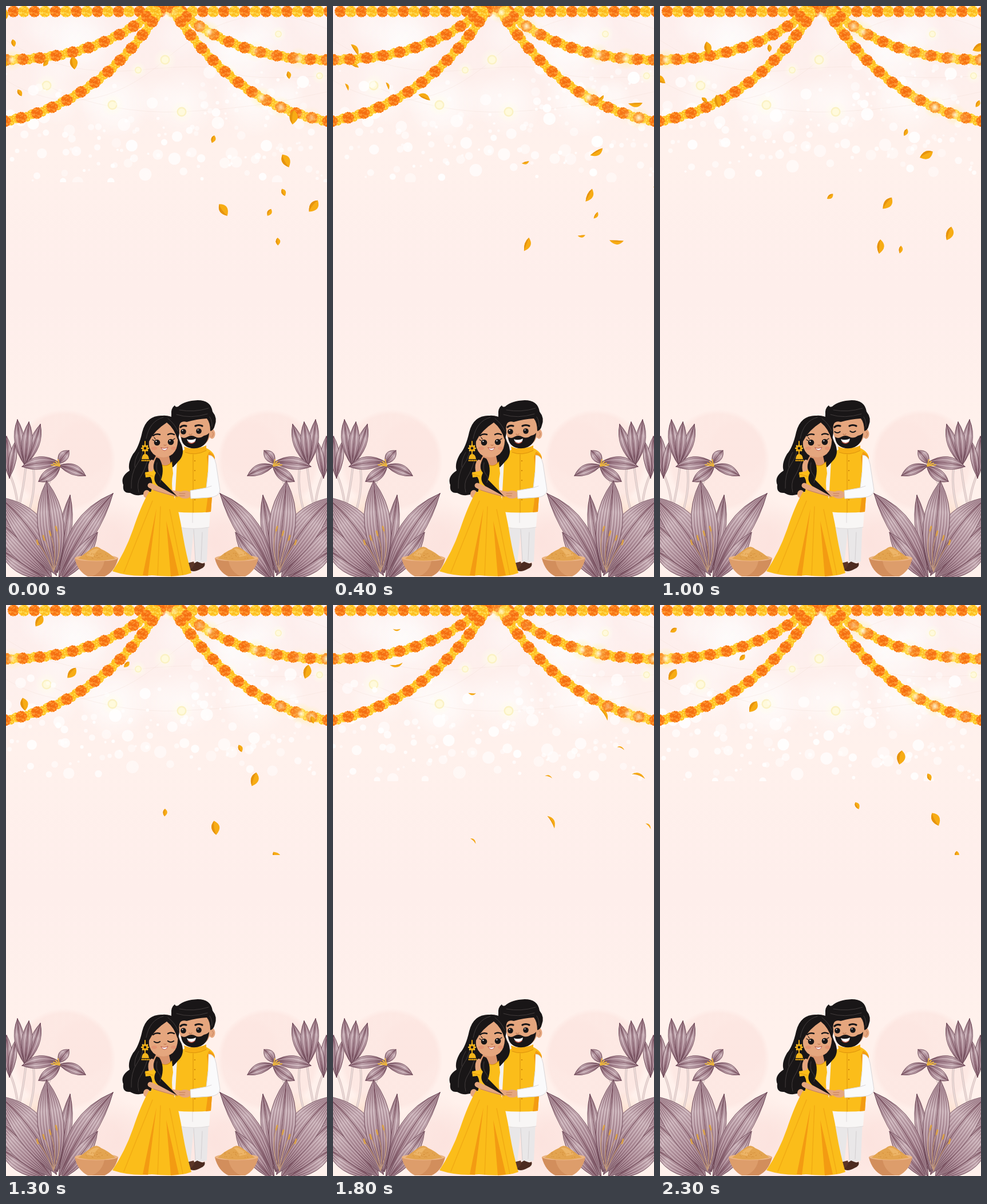
Recreate the animation shown at these times as an HTML page with a canvas. Size 561 by 998 pixels, loop 2400 ms.

```html
<!DOCTYPE html>
<html lang="en">
<head>
<meta charset="utf-8">
<title>Marigold celebration</title>
<style>
html, body { margin: 0; width: 100%; height: 100%; overflow: hidden; background: #fff1ec; }
canvas { display: block; }
</style>
</head>
<body>
<canvas id="stage" width="561" height="998"></canvas>
<script>
const W = 561, H = 998, LOOP = 2400, STEP = 100, TAU = Math.PI * 2;
const stage = document.getElementById('stage').getContext('2d');
let c = stage;

let seed = 11;
const rnd = (min = 0, max = 1) => min + (max - min) * (seed = seed * 16807 % 2147483647) / 2147483647;
const times = (n, make) => Array.from({ length: n }, (_, i) => make(i));

function layer(w, h, draw) {
  const canvas = document.createElement('canvas');
  canvas.width = w;
  canvas.height = h;
  c = canvas.getContext('2d');
  draw();
  c = stage;
  return canvas;
}

function fill(d, color) {
  c.fillStyle = color;
  c.fill(new Path2D(d));
}

function line(d, color, width = 1) {
  c.strokeStyle = color;
  c.lineWidth = width;
  c.lineCap = c.lineJoin = 'round';
  c.stroke(new Path2D(d));
}

function oval(x, y, rx, ry, color) {
  c.fillStyle = color;
  c.beginPath();
  c.ellipse(x, y, rx, ry, 0, 0, TAU);
  c.fill();
}

const dot = (x, y, r, color) => oval(x, y, r, r, color);

function glow(x, y, r, rgb, alpha, hold = 0) {
  const g = c.createRadialGradient(x, y, 0, x, y, r);
  g.addColorStop(0, `rgba(${rgb},${alpha})`);
  g.addColorStop(hold, `rgba(${rgb},${alpha})`);
  g.addColorStop(1, `rgba(${rgb},0)`);
  dot(x, y, r, g);
}

function mirrored(draw) {
  draw();
  c.save();
  c.translate(W, 0);
  c.scale(-1, 1);
  draw();
  c.restore();
}

function below(limit, draw) {
  c.save();
  c.beginPath();
  c.rect(0, 0, W, limit);
  c.clip();
  draw();
  c.restore();
}

// Backdrop

function washes() {
  const peach = '251,222,217';
  glow(102, 795, 90, peach, .45, .9);
  glow(135, 775, 54, peach, .15, .8);
  glow(175, 930, 75, '249,214,210', .4, .3);
  glow(60, 895, 45, '250,214,190', .6, .3);
  glow(230, 960, 90, peach, .4, .4);
}

function backdrop() {
  const g = c.createLinearGradient(0, 0, 0, H);
  ['#fdeeed', '#fff1ec', '#feeeeb', '#fff1ec', '#fff1ec'].forEach((color, i) => g.addColorStop(i / 4, color));
  c.fillStyle = g;
  c.fillRect(0, 0, W, H);
  for (let i = 0; i < 26; i++) {
    glow(rnd(0, W), rnd(0, 185), rnd(25, 70), '255,255,255', .3, .3);
  }
  for (const x of [190, 310, 435]) glow(x, 170, 60, '255,255,255', .65);
  line('M0 60Q100 125 231 112T391 115T561 122M0 130Q140 215 278 94T561 40M70 139Q180 190 307 185T561 150',
    'rgba(240,216,208,.4)', .8);
  [[278, 94], [186, 173], [307, 185], [71, 139], [231, 112], [476, 49], [391, 115], [548, 122]]
    .forEach(([x, y], i) => {
      const r = i < 4 ? 8.5 : 6;
      glow(x, y, r * 2.4, '255,253,235', .9);
      dot(x, y, r, '#fbf2c4');
      dot(x, y, r * .72, '#fffadc');
    });
  mirrored(washes);
}

// Floating lights, denser towards the top right

const lights = times(190, () => ({
  x: rnd(0, W), y: rnd(115, 310), r: 2 + 9 * rnd() ** 2, a: rnd(.45, .95), p: rnd(0, .8)
})).filter(({ x, y }) => y > 205 || x > 340 || rnd() < .25);

function drawLights(t) {
  const w = t / LOOP * TAU;
  for (const { x, y, r, a, p } of lights) {
    dot(x + 16 * (Math.sin(w + p) - Math.sin(p)), y - 8 * (1 - Math.cos(w + p)), r,
      `rgba(255,255,255,${a * (.85 + .15 * Math.cos(w + p * 8))})`);
  }
}

// Marigold garlands

function marigold(dark, mid, light) {
  return layer(48, 48, () => {
    c.translate(24, 24);
    for (let ring = 18; ring > 2; ring -= 4.5) {
      const n = Math.round(ring * .7) + 2;
      dot(0, 0, ring + 2, dark);
      for (let i = 0; i < n; i++) {
        const a = i / n * TAU + ring;
        const x = Math.cos(a) * ring, y = Math.sin(a) * ring;
        dot(x, y, 3 + ring / 9, i % 3 ? mid : light);
        dot(x * .86, y * .86, 1.4, dark);
      }
    }
  });
}

const orange = marigold('#e5500a', '#f97714', '#ff9a33');
const yellow = marigold('#f5a10e', '#ffc122', '#ffdd55');

function bloom(img, x, y, r) {
  c.drawImage(img, x - r, y - r, r * 2, r * 2);
}

// Evenly spaced points on a quadratic curve
function beadsOn(x0, y0, cx, cy, x1, y1, gap = 9.4) {
  const mix = (a, b, d, u) => (1 - u) ** 2 * a + 2 * u * (1 - u) * b + u * u * d;
  const beads = [[x0, y0]];
  for (let u = 0; u <= 1; u += .002) {
    const x = mix(x0, cx, x1, u), y = mix(y0, cy, y1, u);
    const [px, py] = beads[beads.length - 1];
    if (Math.hypot(x - px, y - py) >= gap) beads.push([x, y]);
  }
  return beads;
}

const strands = [beadsOn(268, 0, 165, 97, -12, 94), beadsOn(272, 3, 161, 178, -12, 203)];

function garlands() {
  for (let i = 0; i < 31; i++) bloom(i % 2 ? yellow : orange, 13 + i * 18.4, 9.5, 10.8);
  mirrored(() => {
    for (const beads of strands) {
      beads.forEach(([x, y], i) => i % 3 && bloom(yellow, x, y + (i % 3 - 1.5) * 2, 9));
      beads.forEach(([x, y], i) => i % 3 || bloom(orange, x, y, 10.8));
    }
    bloom(yellow, 262, 10, 10);
  });
  glow(281, 18, 9, '255,250,240', .8, .3);
}

const glints = strands.flat().filter(() => rnd() < .22).map(([x, y]) => [rnd() < .6 ? W - x : x, y]);

function drawGlints(t) {
  glints.forEach(([x, y], i) => {
    const a = .5 + .4 * Math.sin(t / LOOP * TAU * (1 + i % 2) + i * 1.7);
    glow(x, y, 20, '255,240,130', a * .55);
    glow(x, y, 7, '255,255,235', a);
  });
}

// Falling petals: starting points, then one constant drift per size and side

const petals = [];
function shower(side, size, starts) {
  for (const [x, y] of starts) petals.push({ x, y, side, size, angle: rnd(-.7, .7) });
}

shower(-1, 12, [[489, 271], [380, 357], [537, 350], [502, 195], [570, 110], [610, 248], [723, 30], [662, -78]]);
shower(-1, 6.5, [[362, 233], [485, 326], [460, 361], [475, 412], [494, 121], [620, 71], [668, 207]]);
shower(1, 11, [[118, 100], [-4, 17], [-22, -76], [-79, -167], [-105, -21], [-220, -223]]);
shower(1, 6.5, [[13, 65], [24, 152], [69, 100], [-2, 102], [126, -26], [-6, -138], [-126, -186]]);

function drawPetal({ x, y, side, size, angle }, s) {
  const big = size > 8;
  const fallen = y + (big ? 150 : 100) * s;
  if (side > 0 && fallen > 185) return;
  const open = .15 + .85 * Math.abs(Math.cos(s * Math.PI / 1.2 + angle * .3));
  const bend = 9 * (1 - open), half = 13 * open;
  c.save();
  c.translate(x + side * (big ? 105 : 65) * s, fallen);
  c.rotate(angle - side * Math.sin(s * 2.6) * 1.1);
  c.scale(size / 12, size / 12);
  fill(`M0-13Q${bend + half + 3}-2 0 12Q${bend - half}-2 0-13Z`, '#f7ac14');
  fill(`M0-13Q${bend - half * .3}-2 0 12Q${bend - half}-2 0-13Z`, '#e6930e');
  c.restore();
}

// Lilies and bowls

function leaf(x0, y0, x1, y1, width, bend = 0) {
  const dx = x1 - x0, dy = y1 - y0, len = Math.hypot(dx, dy);
  const curve = k => {
    const off = bend + k * width;
    return `${x0 + dx * .55 - dy / len * off} ${y0 + dy * .55 + dx / len * off}`;
  };
  const g = c.createLinearGradient(x0, y0, x1, y1);
  ['#6a4251', '#a98793', '#c9b0b7', '#8c6573'].forEach((color, i) => g.addColorStop(i / 3, color));
  const outline = `M${x0} ${y0}Q${curve(-1)} ${x1} ${y1}Q${curve(1)} ${x0} ${y0}Z`;
  fill(outline, g);
  const count = Math.max(2, Math.round(width / 5));
  for (let i = -count + 1; i < count; i++) {
    line(`M${x0} ${y0}Q${curve(i / count)} ${x1} ${y1}`,
      i % 2 ? 'rgba(98,58,76,.4)' : 'rgba(236,222,226,.55)', .9);
  }
  line(`M${x0} ${y0}Q${curve(0)} ${x1} ${y1}`, '#79505f', 1.3);
  line(outline, 'rgba(95,58,74,.75)', 1);
}

function lilies() {
  const stems = 'M35 798Q32 850 5 945M8 822Q20 850 22 890M90 808Q65 845 52 900M46 795Q55 840 38 890';
  line(stems, '#d9c3c2', 4);
  line(stems, '#f1e3df', 1.5);
  leaf(6, 825, 1, 752, 16);
  leaf(6, 825, 17, 760, 13);
  for (const lean of [-1, 1, 0]) leaf(33, 803, 40 + lean * 20, 727 + lean * 4, 18, lean * 4);
  leaf(92, 800, 110, 777, 17, -3);
  leaf(92, 803, 139, 821, 18, -5);
  leaf(94, 798, 28, 805, 22, 6);
  leaf(95, 804, 57, 831, 20, -3);
  for (let i = 0; i < 4; i++) line(`M94 804L${79 + i * 4} ${802 - i * 3}`, '#e9b23e', 2);

  leaf(90, 990, 112, 855, 22, 3);
  leaf(70, 1002, -12, 948, 34);
  leaf(80, 1000, -20, 895, 54, 10);
  leaf(88, 995, -12, 858, 54, 20);
  leaf(88, 990, 71, 830, 46, -2);
  leaf(92, 1000, 187, 852, 40, -15);
  leaf(95, 1004, 160, 920, 26, 4);
  for (let i = 0; i < 4; i++) {
    const x = 55 + i * 11, y = 938 - i * 8;
    line(`M83 988Q${x + 12} 950 ${x} ${y}`, '#c49a7a', 1.4);
    line(`M${x - 1} ${y - 4}l2 7`, '#d9a048', 3);
  }
}

function bowl() {
  fill('M120 965Q125 988 143 997L172 997Q190 989 196 965Z', '#dd9d6b');
  fill('M160 970L196 965Q190 989 172 997L150 997Q168 990 172 970Z', '#d28e5c');
  oval(158, 965, 38, 5.5, '#ecb584');
  fill('M126 966Q140 955 150 948Q158 942 166 949Q180 955 191 966Q158 973 126 966Z', '#e3a450');
  fill('M140 960Q153 945 163 949Q155 955 153 963Z', '#edb568');
  for (let i = 0; i < 30; i++) dot(rnd(138, 180), rnd(956, 966), .6, '#cf8835');
}

// Couple

const SKIN = '#e5a67e', FOLD = '#c27e58', INK = '#191617', SHEEN = '#423c3c', GOLD = '#fbbd1a', SHADE = '#f39b12';

function eye(x, y, r, closed) {
  if (closed) return line(`M${x - r} ${y}Q${x} ${y + 4} ${x + r} ${y}`, INK, 1.8);
  dot(x, y, r, INK);
  dot(x - r * .3, y - r * .4, r * .2, '#fff');
}

function man(closed) {
  fill('M302 900L354 900L351 971L331 974L328 918L322 976L303 972Z', '#e9e7e8');
  line('M328 915L331 970M343 920L341 968', '#d3cfd1');
  fill('M321 986Q322 977 334 971Q344 976 347 973Q350 980 340 984Q328 991 321 986Z', '#4c2b20');
  fill('M312 975L328 971Q332 978 322 985Z', '#5c3526');
  fill('M297 870L358 870L355 911Q328 916 301 911Z', '#f8f6f5');
  line('M326 886V903M355 911Q328 916 301 911', '#dedada');
  fill('M302 785Q287 798 284 835L302 845Z', '#f4f2f2');
  fill('M299 795Q299 780 315 774L346 771Q364 778 365 790L358 884Q328 887 294 884Z', GOLD);
  fill('M355 779Q365 785 365 790L358 884L349 885Q358 830 351 788Z', SHADE);
  fill('M311 770Q330 778 350 768L350 777Q330 787 313 780Z', '#f8b015');
  line('M313 780Q330 787 350 777M327 784V885', '#dc930c');
  for (let y = 795; y < 880; y += 17) dot(330, y, 1.1, '#c97e08');

  oval(360, 748, 5.5, 8.5, SKIN);
  line('M360 744Q365 747 360 753', FOLD);
  fill('M302 728Q300 771 331 772Q360 768 358 735L354 714Q325 705 302 728Z', SKIN);
  fill('M306 753Q311 757 317 753Q324 749 331 753Q338 757 346 751Q352 750 355 746Q354 764 340 771Q330 775 320 772Q307 768 306 753Z', INK);
  fill('M316 757Q324 760 332 756Q331 764 324 764Q318 763 316 757Z', '#fff');
  line('M318 762Q324 767 330 762', '#b4493c', 1.3);
  fill('M296 735Q287 729 289 714Q288 703 295 698Q296 702 301 700Q312 690 335 689Q358 689 361 709Q370 720 365 733Q363 742 357 743Q357 728 351 721Q333 722 316 727Q305 724 303 733L300 752Q297 743 296 735Z', INK);
  line('M298 714Q322 722 352 713M303 706Q328 711 354 703M356 718Q361 726 360 735', SHEEN, 1);
  line('M305 736Q309 732 315 734M331 734Q337 731 343 734', INK, 3.2);
  line('M320 748Q322 751 325 748', FOLD, 1.4);
  eye(310, 744, 4.8, closed);
  eye(337, 743, 4.8, closed);
}

function woman(closed) {
  fill('M272 716Q245 716 238 745Q232 772 222 783Q212 800 216 812Q199 823 205 837Q203 852 217 851Q230 859 245 852L264 845Q274 805 292 806L301 796Q313 785 307 767Q300 755 299 738Q293 716 272 716Z', INK);
  line('M241 765Q240 785 229 801T219 843M247 795Q242 812 235 823T232 850M232 780Q224 794 225 806', SHEEN);
  fill('M264 782H284L288 800L274 808L255 799Z', '#d9946d');
  oval(255, 807, 6.5, 14, SKIN);
  fill('M256 813L266 797Q278 810 290 797L292 817Q288 835 292 854L252 854Q259 832 252 823L244 824L243 815Z', GOLD);
  line('M266 797Q278 810 290 797M243 818L257 822', '#df960d', 1.2);
  oval(246, 853, 6, 7, SKIN);
  fill('M250 849Q270 856 292 851Q303 885 309 925Q315 960 324 991Q300 1000 255 995Q220 999 186 988Q208 955 222 915Q236 873 250 849Z', GOLD);
  fill('M263 878L239 995L248 996Z', SHADE);
  fill('M280 900L288 997L302 995Z', SHADE);
  line('M256 865L206 990M270 875L265 995M286 880L309 994', '#f2ab14', 1.5);
  line('M252 838Q269 848 304 853', SKIN, 9);
  line('M258 846Q280 853 300 858', FOLD);

  fill('M249 745Q245 789 275 789Q303 787 300 750Q296 726 280 724Q255 727 249 745Z', SKIN);
  fill('M245 784Q250 772 250 761Q259 742 281 728Q294 738 300 758Q307 742 297 723Q280 709 252 722Q238 742 241 785Z', INK);
  line('M275 719Q251 725 245 756M283 721Q295 730 300 743', SHEEN);
  for (const x of [259, 293]) oval(x, 773, 5, 3, 'rgba(225,110,90,.3)');
  line('M257 751Q262 747 269 749M283 749Q288 746 294 749', INK, 2.5);
  eye(264, 763, 5.3, closed);
  eye(288, 762, 5.3, closed);
  if (!closed) line('M259 760l-3-2M261 757l-2-3M292 758l3-2', INK, 1.2);
  line('M276 767Q278 769 280 767', FOLD, 1.2);
  fill('M271 772Q277 775 283 771Q281 777 277 777Q272 776 271 772Z', '#fff');
  line('M271 772Q277 775 283 771Q281 777 277 777Q272 776 271 772Z', '#b84c42', .9);
  fill('M263 789Q253 806 262 816Q255 829 266 839Q279 846 299 857Q282 839 271 828Q278 807 268 791Z', INK);
  line('M264 798Q261 811 267 818T269 833', SHEEN);

  dot(243, 773, 5.5, '#e8a510');
  dot(243, 773, 2.2, INK);
  for (let a = 0; a < TAU; a += TAU / 8) dot(243 + 5.8 * Math.cos(a), 773 + 5.8 * Math.sin(a), 1.3, '#f7c431');
  line('M243 766V761M243 779V785', '#e8a510', 2);
  fill('M237 792Q238 783 243 783Q249 783 250 792Z', '#f3b41c');
  for (let x = 238; x < 251; x += 3) dot(x, 794.5, 1.4, '#e8a510');
}

function sleeve() {
  oval(313, 854, 11, 7, SKIN);
  line('M303 852H313M303 856H312', FOLD);
  fill('M354 785Q364 785 367 800L374 846Q373 858 355 859L323 861L322 847L350 842L353 815Z', '#fafafb');
  line('M354 785Q364 785 367 800L374 846Q373 858 355 859L323 861L322 847L350 842L353 815M350 842L359 839', '#d9d6d8');
}

const back = layer(W, H, backdrop);
const front = layer(W, H, () => {
  garlands();
  mirrored(() => { lilies(); bowl(); });
});
const between = (t, a, b) => t >= a && t < b;

function draw(t) {
  c.drawImage(back, 0, 0);
  below(308, () => drawLights(t));
  c.drawImage(front, 0, 0);
  drawGlints(t);
  below(437, () => petals.forEach(p => drawPetal(p, t / 1000)));
  man(between(t, 900, 1100));
  woman(between(t, 1300, 1500));
  sleeve();
}

let shown = -1;
function tick() {
  const t = Math.floor(performance.now() % LOOP / STEP) * STEP;
  if (t !== shown) draw(shown = t);
  requestAnimationFrame(tick);
}
tick();
</script>
</body>
</html>
```
